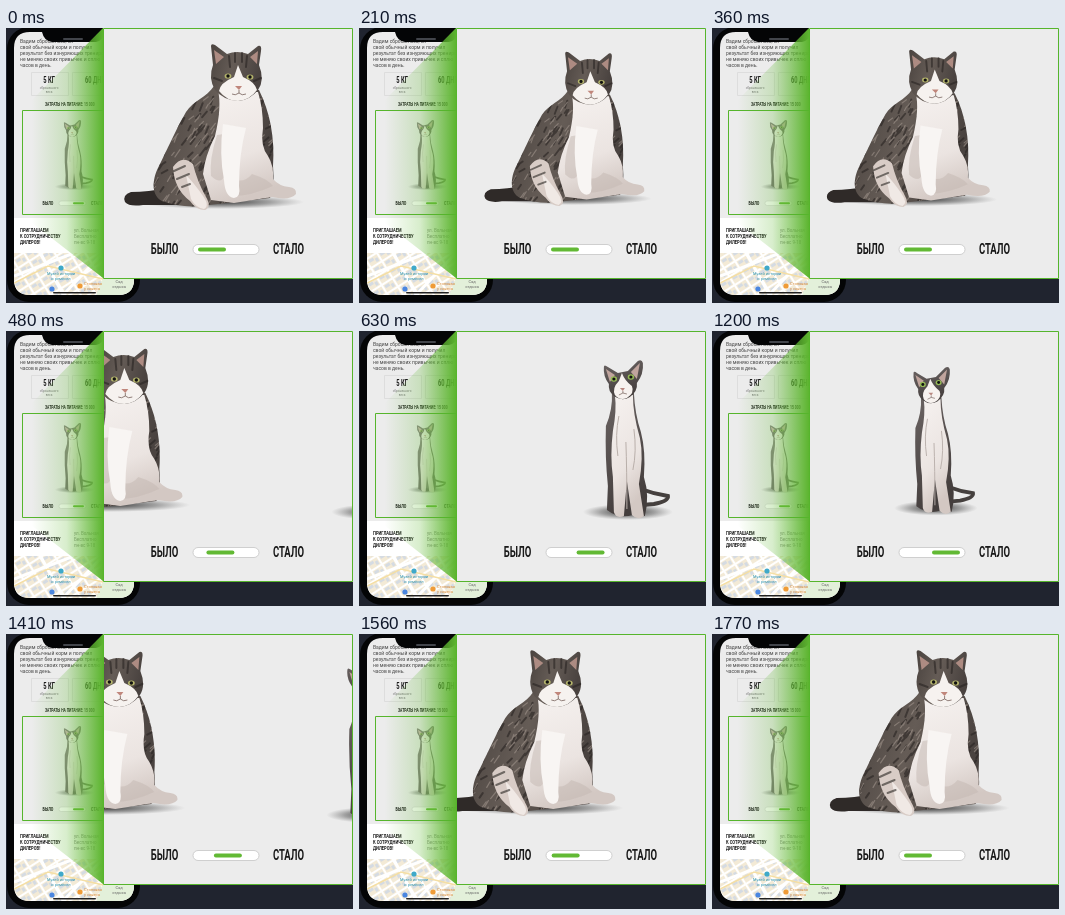
Animation of 347 by 275 pixels, one loop 1800 ms. Source, as an HTML page:

```html
<!DOCTYPE html>
<html lang="ru">
<head>
<meta charset="utf-8">
<style>
html, body { margin: 0; width: 100%; height: 100%; overflow: hidden; background: #20242f; }
svg { display: block; width: 347px; height: 275px; }
text { font-family: Roboto, "Liberation Sans", sans-serif; fill: #1a1a1a; }
.cond { font-weight: 600; transform: scaleX(.68); }
.line { fill: none; stroke: #56b52c; }
.fur { fill: none; stroke: #282422; stroke-width: 2; stroke-linecap: round; opacity: .6; }
</style>
</head>
<body>
<svg viewBox="0 0 347 275">
<defs>
  <linearGradient id="cone"><stop offset=".12" stop-color="#62b934" stop-opacity="0"/><stop offset=".55" stop-color="#62b934" stop-opacity=".25"/><stop offset="1" stop-color="#5cb52f"/></linearGradient>
  <radialGradient id="shade"><stop stop-color="#111" stop-opacity=".85"/><stop offset=".6" stop-color="#333" stop-opacity=".4"/><stop offset="1" stop-color="#555" stop-opacity="0"/></radialGradient>
  <linearGradient id="tabby" x2="1" y2=".3"><stop stop-color="#4a433f"/><stop offset=".5" stop-color="#655c56"/><stop offset="1" stop-color="#4a4340"/></linearGradient>
  <linearGradient id="white" x2=".3" y2="1"><stop stop-color="#f6f2f0"/><stop offset=".65" stop-color="#ebe4e1"/><stop offset="1" stop-color="#d3c8c3"/></linearGradient>
  <linearGradient id="gray" y2="1" x2=".3"><stop stop-color="#6b6463"/><stop offset="1" stop-color="#443e3d"/></linearGradient>
  <pattern id="blocks" width="13" height="10" patternUnits="userSpaceOnUse" patternTransform="rotate(-32)">
    <rect width="13" height="10" fill="#fff"/><path fill="#f3ead6" d="M1 1H12V9H1Z"/><path fill="#d5dbe2" d="M2 2H7V5H2ZM8 4H11V8H8Z"/>
  </pattern>
  <clipPath id="panel"><rect x="97" y="0" width="250" height="250"/></clipPath>
  <clipPath id="screen"><path id="glass" d="M24 4H36Q38 13 46 14H90Q97 13 99 4H112Q128 4 128 20V251Q128 267 112 267H24Q8 267 8 251V20Q8 4 24 4Z"/></clipPath>
  <clipPath id="coat"><path id="body" d="M208 58C201 69 187 73 180 84 170 101 162 120 153 138 145 153 146 168 156 173Q175 180 195 178L228 174 264 170Q269 160 267 138C269 110 264 84 253 62Z"/></clipPath>

  <g id="fatCat">
    <ellipse cx="214" cy="174" rx="84" ry="7" fill="url(#shade)"/>
    <path fill="#2f2a28" d="M160 160Q143 164 125 164 116 167 119 174 123 179 137 177L180 177Z"/>
    <use href="#body" fill="url(#tabby)"/>
    <g clip-path="url(#coat)">
      <path id="dark" class="fur"/>
      <path id="light" class="fur" style="stroke:#a1958d;stroke-width:1.2"/>
    </g>
    <path fill="url(#white)" d="M212 62Q216 79 209 108 199 128 197 146L205 172 228 175 266 169Q284 173 290 166 291 160 283 159 273 158 267 151 268 138 262 128 254 118 257 100 257 80 252 64Z"/>
    <path fill="#c4b8b2" opacity=".5" d="M211 107Q203 132 205 148 216 158 219 146 215 126 218 106ZM222 148Q236 158 246 146 262 151 267 158 246 168 226 168Z"/>
    <path fill="#f8f5f3" d="M217 96Q213 126 218 152 219 169 228 170 235 169 233 158 233 126 240 100Z"/>
    <path fill="#d8ccc6" d="M167 139Q176 126 187 136 191 153 200 169 206 179 199 182 190 182 184 173 168 161 167 139Z"/>
    <path fill="#f0e9e5" d="M180 147Q188 155 197 168 204 178 198 181 190 180 185 171Z"/>
    <path class="fur" d="M168 143L179 138M171 151L183 146M176 159L184 156"/>
    <path fill="url(#tabby)" d="M205 18Q205 15 209 17L221 26Q231 22 242 26L252 18Q256 17 255 23L253 37Q259 52 252 62 244 72 232 73 217 72 209 62 202 50 207 37Z"/>
    <path fill="#ad8b82" d="M208 22L218 29 210 36ZM252 23L244 29 251 36Z"/>
    <path fill="#f6f2ef" d="M232 37L228 49Q214 55 213 63 221 73 232 73 244 72 251 62 249 54 237 49Z"/>
    <path class="fur" d="M223 28L224 39M229 25V34M236 25V34M241 28L240 39M208 50L216 53M255 50L248 53" stroke-width="1.5"/>
    <g fill="#b5b56c"><ellipse cx="222" cy="48" rx="3.4" ry="2.6"/><ellipse cx="244" cy="49" rx="3.4" ry="2.6"/></g>
    <g fill="#111"><circle cx="222" cy="48" r="1.7"/><circle cx="244" cy="49" r="1.7"/></g>
    <path fill="#c0867b" d="M229 58H236L233 62Z"/>
    <path fill="none" stroke="#75605a" stroke-width=".8" d="M233 62V65Q229 68 226 66M233 65Q236 68 240 66"/>
  </g>

  <g id="slimCat">
    <ellipse cx="226" cy="181" rx="45" ry="8" fill="url(#shade)"/>
    <path fill="none" stroke="#45403e" stroke-width="4" stroke-linecap="round" d="M239 158Q252 163 266 165 267 170 252 173L240 174"/>
    <path fill="url(#gray)" d="M210 62Q211 78 204 95 203 126 206 155L205 179Q217 188 231 184L243 185Q248 165 242 146 244 120 239 101 233 83 232 62Z"/>
    <path fill="url(#white)" d="M213 64Q215 79 211 100 208 125 211 146L212 181Q214 188 222 185L225 150 230 184Q236 190 242 185L237 153Q242 126 238 107 231 83 231 64Z"/>
    <path fill="none" stroke="#b9afaa" d="M224 111Q225 139 225 178M217 85Q213 104 216 125M232 98Q235 120 231 139"/>
    <path fill="url(#gray)" d="M202 36Q202 33 206 36L216 42 226 40 236 30Q240 28 241 32 242 43 235 52 236 60 228 66 220 71 212 65 206 60 207 53 201 45 202 36Z"/>
    <path fill="#c0a49d" d="M204 38L213 44 208 51ZM238 32L229 41 235 48Z"/>
    <path fill="#f7f2ef" d="M220 42L217 50Q210 57 213 64 218 70 225 67 233 62 230 55 223 50 220 42Z"/>
    <g fill="#95b955"><ellipse cx="212" cy="48" rx="3.2" ry="2.8"/><ellipse cx="229" cy="46" rx="3.2" ry="2.8"/></g>
    <g fill="#111"><circle cx="212" cy="48" r="1.6"/><circle cx="229" cy="46" r="1.6"/></g>
    <path fill="#b98880" d="M218 57H223L221 60Z"/>
    <path fill="none" stroke="#75605a" stroke-width=".7" d="M221 60V62L217 64M221 62L225 63"/>
  </g>
</defs>

<rect width="347" height="275" fill="#20242f"/>
<rect x="1" y="-1" width="133" height="275" rx="22" fill="#040506"/>
<use href="#glass" fill="#ececec"/>
<g clip-path="url(#screen)">
  <path d="M25.5 44.5H62.5V67.5H25.5ZM66.5 44.5H103V67.5H66.5Z" fill="none" stroke="#dadada" stroke-width=".8"/>
  <use href="#slimCat" transform="translate(-31 79) scale(.44)" opacity=".7"/>
  <rect x="53" y="173" width="27" height="4.5" rx="2.2" fill="#fff" stroke="#ccc" stroke-width=".5"/>
  <rect x="67" y="174.2" width="11" height="2" rx="1" fill="#62b934"/>
  <rect x="8" y="190" width="120" height="35" fill="#fff"/>
  <rect x="8" y="225" width="120" height="43" fill="url(#blocks)"/>
  <path d="M97 250H128V268H90Z" fill="#e3f0da"/>
  <path d="M8 248L68 225M35 226L58 268M56 268L97 225" fill="none" stroke="#fff" stroke-width="3"/>
  <path d="M8 255L42 238 97 251" fill="none" stroke="#f5dfa4" stroke-width="1.5"/>
  <circle cx="55" cy="240" r="2.6" fill="#3fa9c9"/>
  <circle cx="74" cy="258" r="2.6" fill="#ef9b37"/>
  <circle cx="46" cy="261" r="2.6" fill="#4a86e0"/>
  <g id="phoneText"></g>
  <rect x="47" y="264" width="43" height="1.6" rx=".8" fill="#222"/>
</g>
<rect x="57" y="10" width="20" height="2" rx="1" fill="#42454b"/>

<path d="M16 82L97 0V250L16 187Z" fill="url(#cone)"/>
<path d="M97 82.5H16.5V186.5H97" class="line"/>
<rect x="97" width="250" height="251" fill="#ececec"/>
<g clip-path="url(#panel)">
  <g id="slides">
    <use id="fat" href="#fatCat"/>
    <use id="slim" href="#slimCat"/>
  </g>
</g>
<path d="M97.5 .5H346.5V250.5H97.5Z" class="line"/>
<rect x="187" y="216.5" width="66" height="10" rx="5" fill="#fff" stroke="#cfcfcf"/>
<rect id="knob" x="192" y="219.5" width="28" height="4" rx="2" fill="#62b934"/>
<g id="labels"></g>
</svg>
<script>
const $ = id => document.getElementById(id);

function label(group, str, x, y, size, opts = {}) {
  const g = document.createElementNS("http://www.w3.org/2000/svg", "g");
  const el = document.createElementNS(g.namespaceURI, "text");
  g.setAttribute("transform", `translate(${x} ${y})`);
  el.textContent = str;
  el.setAttribute("font-size", size);
  if (opts.mid) el.setAttribute("text-anchor", "middle");
  if (opts.cond) el.setAttribute("class", "cond");
  if (opts.bold) el.style.fontWeight = 700;
  if (opts.fill) el.style.fill = opts.fill;
  g.append(el);
  $(group).append(g);
}

const lines = (list, x, y, step, size, opts) =>
  list.forEach((s, i) => label("phoneText", s, x, y + i * step, size, opts));

lines(["Вадим сбросил вес, ел", "свой обычный корм и получил", "результат без изнуряющих тренировок", "не меняю своих привычек и сплю", "часов в день."], 14, 14.5, 6, 5, { fill: "#444" });
label("phoneText", "5 КГ", 43, 55, 8.5, { cond: 1, mid: 1, bold: 1 });
label("phoneText", "60 ДНЕЙ", 79, 55, 8.5, { cond: 1, bold: 1 });
lines(["сброшенного", "веса"], 43, 61, 3.5, 3, { mid: 1, fill: "#777" });
label("phoneText", "ЗАТРАТЫ НА ПИТАНИЕ: 15 000", 39, 78, 5, { cond: 1, bold: 1 });
label("phoneText", "БЫЛО", 42, 177, 5.5, { cond: 1, mid: 1 });
label("phoneText", "СТАЛО", 85, 177, 5.5, { cond: 1 });
lines(["ПРИГЛАШАЕМ", "К СОТРУДНИЧЕСТВУ", "ДИЛЕРОВ!"], 14, 204, 6, 6, { cond: 1, bold: 1 });
lines(["ул. Вольная", "Бесплатно", "пн-вс 9-18"], 68, 204, 6, 4.5, { fill: "#888" });
lines(["Музей истории", "и ремёсел"], 55, 247, 4.5, 4, { mid: 1, fill: "#2f93ad" });
lines(["Столовая", "у сквера"], 78, 257, 4.5, 4, { fill: "#d98a35" });
lines(["Сад", "отдыха"], 113, 255, 4.5, 4, { mid: 1, fill: "#666" });

label("labels", "БЫЛО", 158.5, 226, 14, { cond: 1, mid: 1 });
label("labels", "СТАЛО", 282.5, 226, 14, { cond: 1, mid: 1 });

// Mottled coat: short seeded strokes following the flank
let seed = 7;
const rand = () => (seed = seed * 16807 % 2147483647) / 2147483647;
function strokes(count) {
  let d = "";
  for (let i = 0; i < count; i++)
    d += `M${145 + rand() * 125} ${65 + rand() * 112}l${-2 - rand() * 4} ${3 + rand() * 5}`;
  return d;
}
$("dark").setAttribute("d", strokes(190));
$("light").setAttribute("d", strokes(130));

const half = 900, travel = 260;

function smooth(t, from, to) {
  const p = Math.min(1, Math.max(0, (t - from) / (to - from)));
  return p * p * (3 - 2 * p);
}

// The CSS "ease" curve, solved by bisection
function ease(x) {
  if (x <= 0) return 0;
  const bez = (p, a, b) => 3 * (1 - p) * p * ((1 - p) * a + p * b) + p ** 3;
  let lo = 0, hi = 1;
  for (let i = 0; i < 20; i++) {
    const p = (lo + hi) / 2;
    if (bez(p, .25, .25) < x) lo = p; else hi = p;
  }
  return bez(lo, .1, 1);
}

const start = performance.now();

function draw() {
  const ms = Math.floor((performance.now() - start) / 30) * 30 % (2 * half);
  const t = ms % half, back = ms >= half;
  const flip = v => back ? 1 - v : v;
  const u = flip(ease((t - 330) / 570));
  const scale = 1 - .07 * (smooth(t, 0, 210) - smooth(t, 300, 480));
  // Shrink about the panel's centre, then slide
  $("slides").setAttribute("transform", `translate(222 125) scale(${scale}) translate(-222 -125)`);
  $("fat").setAttribute("x", -travel * u);
  $("slim").setAttribute("x", travel * (1 - u) - 2);
  $("knob").setAttribute("x", 192 + 28 * flip(smooth(t, 360, 690)));
  requestAnimationFrame(draw);
}
draw();
</script>
</body>
</html>
```
